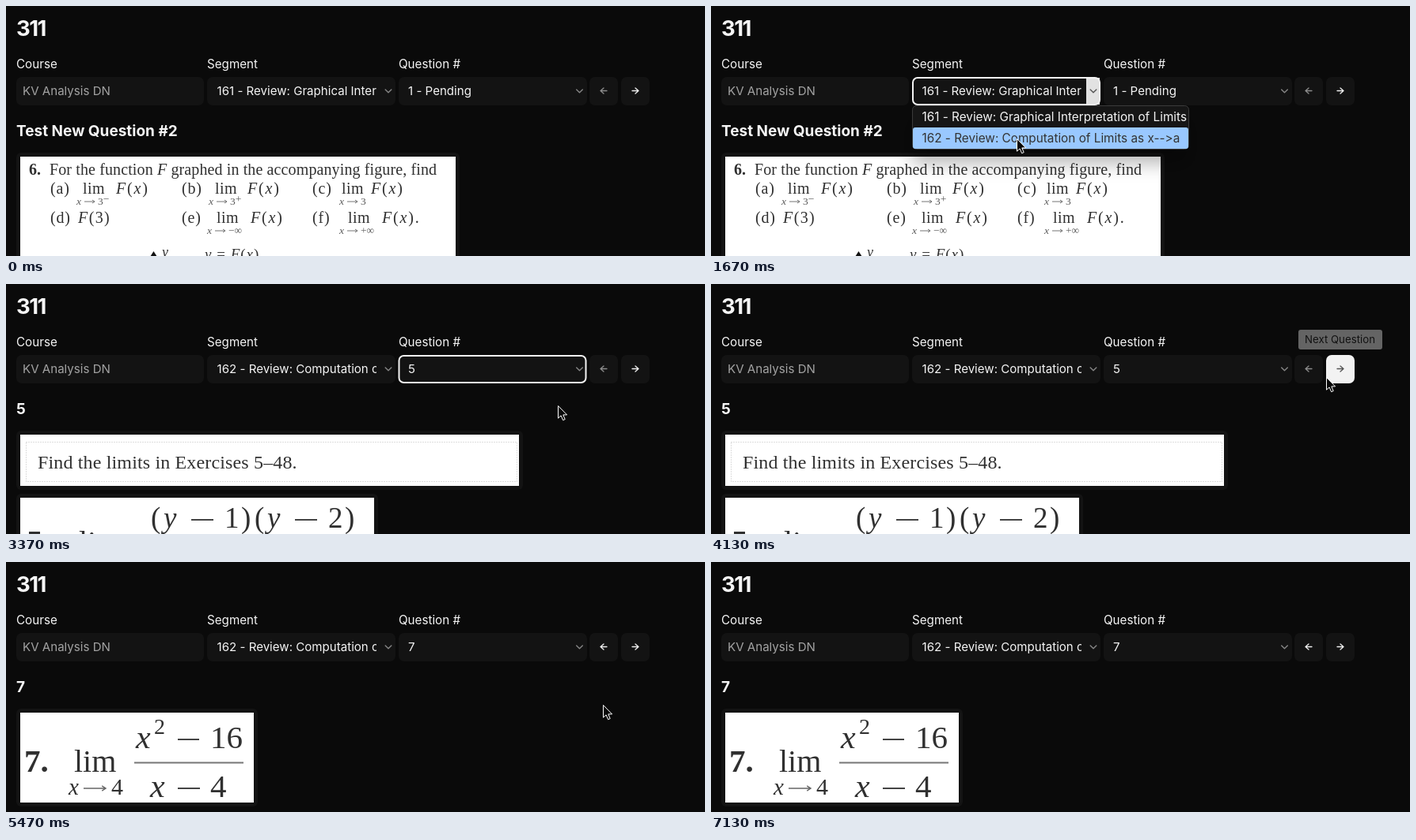
Recreate the animation shown at these times as an HTML page. Size 883 px wide and 317 px high, loop 7230 ms.

```html
<!DOCTYPE html>
<html lang="en">
<head>
<meta charset="utf-8">
<title>Question picker</title>
<style>
  html, body { margin: 0; width: 100%; height: 100%; overflow: hidden; background: #0a0a0a; }
  svg { display: block; width: 883px; height: 317px; }
  text { white-space: pre; }
  .ui { font-family: Inter, "DejaVu Sans", sans-serif; font-feature-settings: "calt" 0; fill: #f5f5f5; }
  .scan { font-family: "Liberation Serif", "Noto Serif", serif; fill: #303030; }
</style>
</head>
<body>
<svg id="stage" viewBox="0 0 883 317"></svg>
<script>
const LOOP = 7230;
const PANEL = '#131313', PALE = '#f2f2f2', DIM = '#8c8c8c';

// Markup helpers
const rect = (x, y, w, h, fill, r = 0, more = '') =>
  `<rect x="${x}" y="${y}" width="${w}" height="${h}" rx="${r}" fill="${fill}" ${more}/>`;
const label = (x, y, s, size = 15.1, more = '') =>
  `<text class="ui" x="${x}" y="${y}" font-size="${size}" ${more}>${s}</text>`;
const mid = 'text-anchor="middle"';
const scan = (x, y, s, size = 20, more = '') =>
  `<text class="scan" x="${x}" y="${y}" font-size="${size}" ${more}>${s}</text>`;
const it = 'font-style="italic"';
const bold = 'font-weight="700"';
const line = (d, color, w, more = '') =>
  `<path d="${d}" fill="none" stroke="${color}" stroke-width="${w}" ${more}/>`;
const group = (id, body, more = '') => `<g id="${id}" ${more}>${body}</g>`;
const round = 'stroke-linecap="round" stroke-linejoin="round"';
const chevron = (x, color = '#858585') => line(`M${x - 3.8} 106l3.8 3.8l3.8-3.8`, color, 1.4, round);
const ring = x => rect(x + 1, 91, 236, 34, 'none', 6, `stroke="${PALE}" stroke-width="2"`);
const paper = (w, h, y = 191) => rect(13, y - 5, w + 10, h + 10, '#131313', 6) + rect(18, y, w, h, '#fff');
const minus = (x, y, w) => line(`M${x} ${y}h${w}`, '#444', 2);
const toArrow = (x, y, w, k = 1) =>
  line(`M${x} ${y}h${w}m${-3 * k} ${-2 * k}l${3 * k} ${2 * k}l${-3 * k} ${2 * k}`, '#666', 0.9 * k);

// One "(a) lim F(x)" entry; the limit is printed below
function limit(x, y, tag, limX, fx, subX, target, tail = '') {
  const faint = 'style="fill:#5a5a5a"';
  return scan(x, y, tag, 20, 'letter-spacing="0.8"') +
    scan(limX, y, 'lim', 20, 'letter-spacing="0.4"') +
    scan(fx, y, `<tspan ${it}>F</tspan>(<tspan ${it}>x</tspan>)${tail}`, 20, 'letter-spacing="1.8"') +
    scan(subX, y + 14, 'x', 13.5, it + faint) + toArrow(subX + 10, y + 10, 13) +
    scan(subX + 27, y + 14, target, 13.5, faint);
}

function graphPaper() {
  return paper(550, 150) +
    scan(29, 214, '6.', 20, bold) +
    scan(55, 214, `For the function <tspan ${it}>F</tspan> graphed in the accompanying figure, find`, 20,
      'letter-spacing="0.12"') +
    limit(56, 238, '(a)', 97, 139, 89, '3<tspan dy="-3">−</tspan>') +
    limit(222, 238, '(b)', 264, 305, 256, '3<tspan dy="-3">+</tspan>') +
    limit(387, 238, '(c)', 424, 461, 421, '3') +
    scan(56, 275, '(d)', 20, 'letter-spacing="0.8"') +
    scan(91, 275, `<tspan ${it}>F</tspan>(3)`, 20, 'letter-spacing="1.4"') +
    limit(222, 275, '(e)', 266, 309, 254, '−∞') +
    limit(387, 275, '(f)', 432, 475, 421, '+∞', '.') +
    `<path d="M182 318l4.5-7l4.5 7z" fill="#111"/>` +
    scan(197, 318, 'y', 18, it) +
    scan(251, 321, `<tspan ${it}>y</tspan> = <tspan ${it}>F</tspan>(<tspan ${it}>x</tspan>)`, 19,
      'letter-spacing="1"');
}

function findPaper() {
  return paper(630, 65) +
    rect(25.5, 200.5, 620, 50, 'none', 0, 'stroke="#bbb" stroke-dasharray="1 2"') +
    scan(40, 234, 'Find the limits in Exercises 5–48.', 24, 'letter-spacing="0.15"');
}

function fractionFive() {
  const half = (x, n) => scan(x, 309, '(', 37) + scan(x + 16, 309, 'y', 37, it) +
    minus(x + 51, 299, 28) + scan(x + 93, 309, n, 37) + scan(x + 114, 309, ')', 37);
  return paper(447, 120, 271) + half(183, '1') + half(314, '2') +
    scan(26, 340, '5.', 41, bold) + scan(92, 341, 'lim', 40);
}

function fractionSeven() {
  return paper(295, 114) +
    scan(23, 266, '7.', 41, bold) + scan(86, 266, 'lim', 40) +
    scan(79, 295, 'x', 29, it) + toArrow(98, 287, 28, 1.6) + scan(133, 295, '4', 30) +
    scan(164, 236, 'x', 42, it) + scan(187, 218, '2', 28) + minus(217, 225, 27) +
    scan(258, 236, '16', 41) + line('M162 254.5h138', '#777', 2) +
    scan(182, 298, 'x', 42, it) + minus(217, 287, 28) + scan(258, 298, '4', 41);
}

// Dot, answer tabs and keys, drawn for a dot at y = 191
function answerForm() {
  const tabs = [['Math', 105], ['Set', 164], ['Matrix', 227]];
  const keys = ['±', '√', '∞', 'π', 'Σ', 'θ', '∛', '∜', '∫', '→'];
  return `<circle cx="18" cy="191" r="4.7" fill="#161616"/>` +
    rect(13, 208, 252, 36, '#141414', 6) + rect(17, 212, 54, 28, PALE, 4) +
    label(44, 231, 'Text', 15.2, mid + ' style="fill:#171717"') +
    tabs.map(([s, x]) => label(x, 231, s, 15.2, mid)).join('') +
    label(13, 274, 'Answer', 15.2) +
    keys.map((s, i) => rect(13 + 76.4 * i, 285, 72, 36, '#151515', 7) +
      label(49 + 76.4 * i, 308, s, 16, mid)).join('') +
    `<circle cx="795" cy="303" r="18" fill="#151515"/>` +
    [790, 795, 800].map(x => `<circle cx="${x}" cy="302" r="1.9" fill="#f5f5f5"/>`).join('');
}

function navButton(id, x, dir) {
  const c = x + 18, s = 4 * dir;
  return rect(x, 90, 36, 36, PANEL, 7) + rect(x, 90, 36, 36, PALE, 7, `id="${id}Hot" opacity="0"`) +
    line(`M${c - s} 107.5H${c + s}M${c} 104l${s} 3.5l${-s} 3.5`, '#eee', 1.3, `id="${id}" ${round}`);
}

function popup() {
  return rect(254.5, 126.5, 349, 55, PANEL, 5, 'stroke="#3a3a3a" filter="url(#shade)"') +
    rect(255, 154, 348, 27, '#99c8ff', 3, 'id="pick"') +
    label(266.5, 146, '161 - Review: Graphical Interpretation of Limits', 15.3) +
    label(266.5, 173, '162 - Review: Computation of Limits as x--&gt;a', 15.3, 'id="second"');
}

document.getElementById('stage').innerHTML =
  `<defs><clipPath id="segClip"><rect x="254" y="90" width="214" height="36"/></clipPath>
   <filter id="shade" x="-10%" y="-30%" width="120%" height="240%">
     <feDropShadow dx="0" dy="18" stdDeviation="11" flood-color="#000" flood-opacity=".28"/></filter></defs>` +
  rect(0, 0, 883, 317, '#0a0a0a') +
  group('page',
    label(13, 38, '311', 27.5, bold + ' letter-spacing="-1.5"') +
    label(13, 79, 'Course', 15.2) + label(254, 79, 'Segment', 15.2) + label(496, 79, 'Question #', 15.2) +
    [13, 254, 496].map(x => rect(x, 90, x === 13 ? 237 : 238, 36, PANEL, 7)).join('') +
    label(21, 113, 'KV Analysis DN', 15.1, 'style="fill:#a3a3a3"') +
    label(266.5, 113, '', 15.1, 'id="segment" clip-path="url(#segClip)"') +
    label(508, 113, '', 15.1, 'id="question"') +
    chevron(483) + chevron(724.5) +
    group('segHot', rect(474, 91, 17, 34, '#e2e2e2') + chevron(483, '#555')) +
    group('segRing', ring(254)) + group('qRing', ring(495.5)) +
    navButton('prev', 737, -1) + navButton('next', 777, 1) +
    label(13, 165, '', 19, bold + ' id="title"') +
    group('graph', graphPaper()) + group('find', findPaper()) + group('five', fractionFive()) +
    group('seven', fractionSeven()) + group('form', answerForm()) + group('popup', popup()) +
    group('tip', rect(742, 58, 106, 25, '#f0f0f0', 3) +
      label(750, 75, 'Next Question', 13.25, 'style="fill:#1c1c1c"'))) +
  group('cursor', '<path d="M.5 .5V16.2L4.1 12.9L6.6 18.7L9.2 17.6L6.8 11.9H11.6Z" fill="#080808" stroke="#fff"/>');

const $ = Object.fromEntries([...document.querySelectorAll('[id]')].map(e => [e.id, e]));
const within = (t, a, b) => t >= a && t < b;
const show = (el, on) => el.setAttribute('visibility', on ? 'visible' : 'hidden');
const write = (el, s) => { if (el.textContent !== s) el.textContent = s; };
const clamp = v => Math.max(0, Math.min(1, v));
const ramp = (t, a, b) => clamp((t - a) / (b - a));
const fade = (t, inAt, outAt, d = 130) => ramp(t, inAt, inAt + d) * (1 - ramp(t, outAt, outAt + d));

// Pointer path: time, x, y
const path = [
  [530, 373, 265], [970, 412, 106], [1130, 412, 106], [1640, 386, 168], [2530, 386, 168],
  [3120, 672, 112], [3240, 680, 120], [3370, 697, 154], [3500, 714, 161], [3970, 771, 119],
  [4280, 783, 118], [4640, 783, 118], [5200, 767, 108], [5470, 754, 181], [5600, 754, 181],
  [5970, 478, 249], [6330, 132, 312]
];
function pointer(t) {
  const i = path.findIndex(p => p[0] > t);
  const [t0, x0, y0] = path[i - 1], [t1, x1, y1] = path[i];
  const u = (t - t0) / (t1 - t0), k = u * u * (3 - 2 * u);
  return [x0 + (x1 - x0) * k, y0 + (y1 - y0) * k];
}

function render(t) {
  const bare = within(t, 4570, 4700);      // short page, no scrollbar
  const loading = within(t, 2270, 2530);
  const first = t < 2270;

  $.page.setAttribute('transform', `translate(${bare ? 8 : 0} 0)`);
  write($.segment, t < 2230 ? '161 - Review: Graphical Inter' : '162 - Review: Computation of Limits');
  write($.question, first ? '1 - Pending' : loading ? '' : t < 4530 ? '5' : '7');
  write($.title, first ? 'Test New Question #2' : loading ? '' : t < 4570 ? '5' : '7');

  show($.graph, first);
  show($.find, within(t, 2530, 4570));
  show($.five, within(t, 2600, 4570));
  show($.seven, t >= 4700);
  show($.form, within(t, 2530, 2600) || bare);
  $.form.setAttribute('transform', `translate(0 ${bare ? 0 : 80})`);

  show($.segHot, within(t, 870, 2230));
  show($.segRing, within(t, 1130, 3120));
  show($.qRing, within(t, 3120, 3700));
  show($.popup, within(t, 1130, 2230));
  const low = t >= 1480;
  $.pick.setAttribute('y', low ? 154 : 127);
  $.second.style.fill = low ? '#333' : '#f5f5f5';

  const nextHot = fade(t, 4000, 4760), prevHot = fade(t, 5080, 5230);
  $.nextHot.setAttribute('opacity', nextHot);
  $.prevHot.setAttribute('opacity', prevHot);
  $.next.setAttribute('stroke', nextHot > .5 ? '#555' : loading ? DIM : '#eee');
  $.prev.setAttribute('stroke', prevHot > .5 ? '#222' : t < 4700 ? DIM : '#eee');
  $.tip.setAttribute('opacity', fade(t, 4080, 4760));

  const seen = within(t, 530, 6330);
  show($.cursor, seen);
  if (seen) $.cursor.setAttribute('transform', `translate(${pointer(t).map(v => Math.round(v)).join(' ')})`);
}

function tick() {
  render(performance.now() % LOOP);
  requestAnimationFrame(tick);
}
tick();
</script>
</body>
</html>
```
